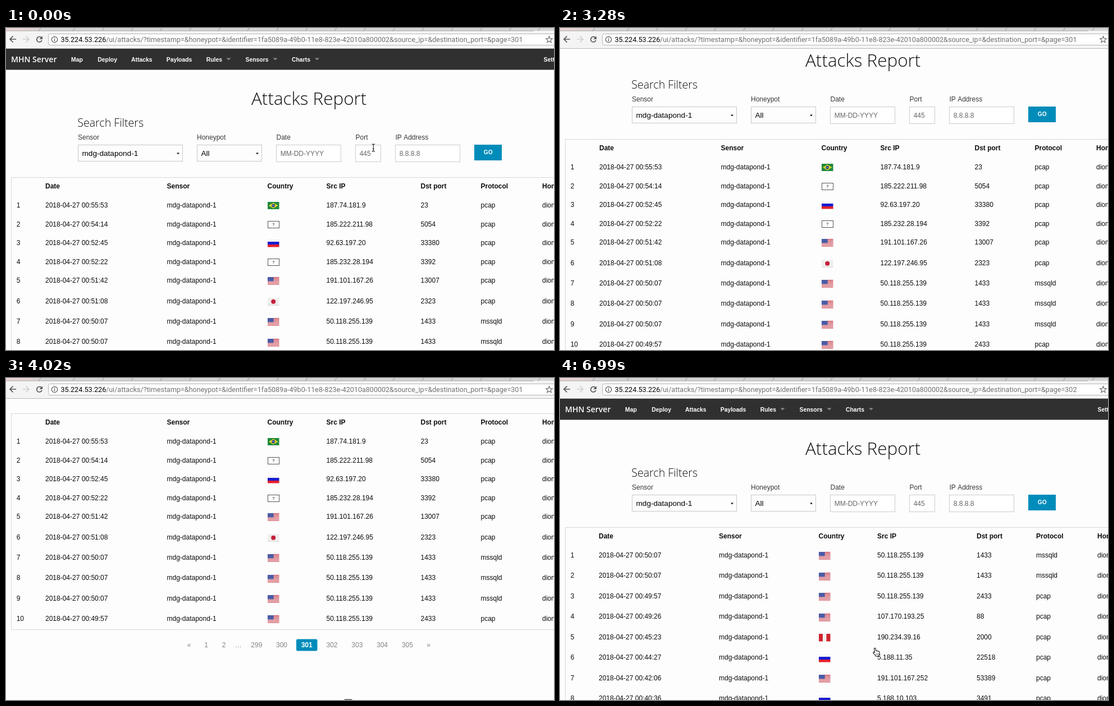
Recreate the animation shown at these times as an HTML page with a canvas. Size 976 by 574 pixels, loop 8 s.

```html
<!DOCTYPE html>
<html lang="en">
<head>
<meta charset="utf-8">
<title>Attacks Report</title>
<style>
html, body { margin: 0; width: 100%; height: 100%; overflow: hidden; background: #fdfdfd; }
canvas { display: block; width: 976px; height: 574px; }
</style>
</head>
<body>
<canvas id="stage" width="976" height="574"></canvas>
<script>
const ctx = document.getElementById('stage').getContext('2d');
const W = 976, H = 574, LOOP = 8000;
const SANS = '"Liberation Sans", Arial, sans-serif';
const OPEN = '"Open Sans", sans-serif';
const ROBOTO = 'Roboto, sans-serif';
const INK = '#0c0c0c';
const SENSOR = 'mdg-datapond-1';
const HOST = '35.224.53.226';
const PATH = '/ui/attacks/?timestamp=&honeypot=&identifier=1fa5089a-49b0-11e8-823e-42010a800002&source_ip=&destination_port=&page=';

// [time, value] steps, each held until the next one
const SCROLL = [[0, 0], [2840, 34], [3280, 68], [3430, 102], [3570, 136], [3720, 170], [3870, 198], [4020, 203], [6990, 0]];
const POINTER = [
  [0, ['beam', 650, 206]], [140, ['arrow', 703, 97]], [290, ['arrow', 889, 143]], [440, null],
  [4460, ['arrow', 902, 340]], [4610, ['arrow', 754, 416]], [4760, ['arrow', 699, 429]],
  [4910, ['arrow', 660, 429]], [5210, ['arrow', 599, 470]], [5360, ['arrow', 596, 472]],
  [5500, ['hand', 565, 477.5]], [5650, ['hand', 557, 480.5]]
];

const FIRST = {
  cols: [70, 286.5, 465.5, 570.5, 738.5, 845.5, 955],
  rowY: i => i < 5 ? 315.5 + 33.6 * i : 449.9 + 36.4 * (i - 4),
  rows: [
    '00:55:53 br 187.74.181.9 23 pcap', '00:54:14 ? 185.222.211.98 5054 pcap',
    '00:52:45 ru 92.63.197.20 33380 pcap', '00:52:22 ? 185.232.28.194 3392 pcap',
    '00:51:42 us 191.101.167.26 13007 pcap', '00:51:08 jp 122.197.246.95 2323 pcap',
    '00:50:07 us 50.118.255.139 1433 mssqld', '00:50:07 us 50.118.255.139 1433 mssqld',
    '00:50:07 us 50.118.255.139 1433 mssqld', '00:49:57 us 50.118.255.139 2433 pcap'
  ]
};
const SECOND = {
  cols: [69, 283, 460.5, 565, 742, 848, 957],
  rowY: i => 315.5 + 36.5 * i,
  rows: [
    '00:50:07 us 50.118.255.139 1433 mssqld', '00:50:07 us 50.118.255.139 1433 mssqld',
    '00:49:57 us 50.118.255.139 2433 pcap', '00:49:26 us 107.170.193.25 88 pcap',
    '00:45:23 pe 190.234.39.16 2000 pcap', '00:44:27 ru 5.188.11.35 22518 pcap',
    '00:42:06 us 191.101.167.252 53389 pcap', '00:40:36 ru 5.188.10.103 3491 pcap'
  ]
};
const HEADS = ['Date', 'Sensor', 'Country', 'Src IP', 'Dst port', 'Protocol', 'Honeypot'];

function at(steps, t) {
  let value = steps[0][1];
  for (const [time, v] of steps) if (t >= time) value = v;
  return value;
}

function text(s, x, y, font, color, align = 'left') {
  ctx.font = font;
  ctx.fillStyle = color;
  ctx.textAlign = align;
  ctx.fillText(s, x, y);
}

function rect(x, y, w, h, color) {
  ctx.fillStyle = color;
  ctx.fillRect(x, y, w, h);
}

function box(x, y, w, h, fill, border) {
  rect(x, y, w, h, fill);
  ctx.strokeStyle = border;
  ctx.lineWidth = 1;
  ctx.strokeRect(x + .5, y + .5, w - 1, h - 1);
}

function rounded(x, y, w, h, r, fill, border) {
  ctx.beginPath();
  ctx.roundRect(x, y, w, h, r);
  ctx.fillStyle = fill;
  ctx.fill();
  if (border) stroke(null, border, 1);
}

function stroke(path, color, width) {
  ctx.strokeStyle = color;
  ctx.lineWidth = width;
  path ? ctx.stroke(new Path2D(path)) : ctx.stroke();
}

function dot(x, y, r, color) {
  ctx.beginPath();
  ctx.arc(x, y, r, 0, 7);
  ctx.fillStyle = color;
  ctx.fill();
}

function fillPath(path, color) {
  ctx.fillStyle = color;
  ctx.fill(new Path2D(path));
}

function triangle(x, y, w, h, color) {
  fillPath(`M${x - w / 2} ${y}h${w}l${-w / 2} ${h}z`, color);
}

function flag(kind, x, y) {
  ctx.save();
  ctx.translate(Math.round(x), Math.round(y - 5.5));
  if (kind === '?') {
    box(0, 0, 21, 13, '#fff', '#555');
    text('?', 10.5, 9, 'bold 7px ' + SANS, '#555', 'center');
  } else if (kind === 'br') {
    rect(0, 0, 20.5, 13, '#1f8a3c');
    fillPath('M2 6.5L10.2 1.5L18.5 6.5L10.2 11.5z', '#ecd42c');
    dot(10.2, 6.5, 3, '#25457f');
    stroke('M7.5 6Q10 5.5 12.7 7.5', '#bcd2dc', .8);
  } else if (kind === 'ru') {
    rect(0, 0, 20.5, 4.5, '#f5f5f5');
    rect(0, 4, 20.5, 5, '#1b1bd0');
    rect(0, 9, 20.5, 4.5, '#e51f2b');
  } else if (kind === 'jp') {
    rect(0, 0, 20.5, 13.5, '#f0eeee');
    rect(0, 12.5, 20.5, 1, '#d5d3d3');
    dot(10.2, 6.8, 4, '#c51f3b');
  } else if (kind === 'pe') {
    rect(0, 0, 20.5, 13.5, '#f3efef');
    rect(0, 0, 7, 13.5, '#cf2530');
    rect(13.5, 0, 7, 13.5, '#cf2530');
  } else {
    for (let i = 0; i < 13; i++) rect(0, i * 1.04, 20.5, 1.04, i % 2 ? '#ecd2d4' : '#c93443');
    rect(0, 0, 10.5, 7.3, '#3d4f9f');
    for (let i = 0; i < 12; i++) rect(1 + i % 4 * 2.3, 1 + Math.floor(i / 4) * 2.1, .8, .8, '#a5add4');
  }
  ctx.restore();
}

function chrome(loading, page) {
  rect(0, 0, W, 37, '#f4f4f4');
  rect(0, 0, W, 5, '#d6d4d5');
  const glow = ctx.createLinearGradient(0, 0, 62, 0);
  glow.addColorStop(0, '#ecd3d1');
  glow.addColorStop(1, '#dcd5d5');
  rect(0, 0, 62, 5, glow);
  rect(0, 4.5, 940, 1, '#a9a7a8');
  for (let i = 0; i < 18; i++) {
    const x = i ? 67 + i * 51.8 : 58;
    stroke(`M${x} 5l4 -5`, '#8d8b8c', 1);
  }
  rect(0, 36, W, 1, '#b9b9b9');

  stroke('M18 20H7.5M12.5 14.5L7 20L12.5 25.5', '#555', 1.7);
  stroke('M30 20H40.5M35.5 14.5L41 20L35.5 25.5', '#cfcfcf', 1.7);
  if (loading) {
    stroke('M55 16L64 25M64 16L55 25', '#555', 1.7);
  } else {
    ctx.beginPath();
    ctx.arc(59.5, 20.3, 4.7, .35, 5.5);
    stroke(null, '#555', 1.7);
    fillPath('M65 14.5V20H59.5z', '#555');
  }
  rounded(75.5, 10.5, 920, 20, 3, '#fff', '#b5b5b5');
  ctx.beginPath();
  ctx.arc(86.5, 20.5, 5.2, 0, 7);
  stroke(null, '#555', 1.2);
  rect(85.8, 17.5, 1.4, 1.4, '#555');
  rect(85.8, 19.8, 1.4, 3.6, '#555');
  text(HOST, 97.5, 24.5, '12.6px ' + ROBOTO, '#000');
  text(PATH + page, 178, 24.5, '12.55px ' + ROBOTO, '#707070');

  ctx.beginPath();
  for (let i = 0; i < 10; i++) {
    const a = -Math.PI / 2 + i * Math.PI / 5, r = i % 2 ? 2.7 : 6.2;
    ctx.lineTo(967.5 + r * Math.cos(a), 20.8 + r * Math.sin(a));
  }
  ctx.closePath();
  stroke(null, '#666', 1.1);
}

function navBar() {
  rect(0, 37, W, 37.5, '#303030');
  text('MHN Server', 9, 61, '600 14px ' + OPEN, '#fff');
  const items = [['Map', 116], ['Deploy', 163.3], ['Attacks', 223], ['Payloads', 285.7],
    ['Rules', 356.7, 396.5], ['Sensors', 426.5, 479.5], ['Charts', 509, 554], ['Settings', 957.5]];
  for (const [label, x, arrow] of items) {
    text(label, x, 59.5, 'bold 10.4px ' + SANS, '#fff');
    if (arrow) triangle(arrow, 53.5, 8, 4, '#858585');
  }
}

function filters() {
  text('Attacks Report', 437, 136.7, '300 31.45px ' + OPEN, '#111');
  text('Search Filters', 127.3, 176.3, '300 19.6px ' + OPEN, '#111');
  const labels = [['Sensor', 128], ['Honeypot', 340], ['Date', 481.5], ['Port', 622.5], ['IP Address', 693.5]];
  for (const [label, x] of labels) text(label, x, 199, '12px ' + SANS, '#383838');
  for (const [x, w, value] of [[128, 187, SENSOR], [340, 116, 'All']]) {
    box(x, 208, w, 30, '#fdfdfd', '#c8c8c8');
    text(value, x + 7.5, 228, '13.6px ' + SANS, '#000');
    triangle(x + w - 8.5, 222.5, 5, 3, '#111');
  }
  for (const [x, w, hint] of [[481, 116, 'MM-DD-YYYY'], [622, 46, '445'], [693, 116, '8.8.8.8']]) {
    box(x, 208, w, 31, '#fff', '#ccc');
    text(hint, x + 7.7, 228, '12px ' + SANS, '#666');
  }
  rect(834, 208, 49, 28, '#008cba');
  text('GO', 858.7, 225, 'bold 10.2px ' + SANS, '#fff', 'center');
}

function table({ cols, rowY, rows }) {
  box(9, 266, 1100, 386, '#fdfdfd', '#d8d8d8');
  HEADS.forEach((head, i) => text(head, cols[i], 286, 'bold 12px ' + SANS, INK));
  rows.forEach((row, i) => {
    const [time, country, ip, port, protocol] = row.split(' ');
    const y = rowY(i), baseline = Math.round(y + 4.4);
    const cells = ['2018-04-27 ' + time, SENSOR, null, ip, port, protocol, 'dionaea'];
    text(i + 1, 18.7, baseline, '12px ' + SANS, INK);
    cells.forEach((cell, c) => cell && text(cell, cols[c], baseline, '12px ' + SANS, INK));
    flag(country, cols[2], y);
  });
}

function pager(hover) {
  const items = [['«', 326], ['1', 356.5], ['2', 388], ['…', 414], ['299', 446.3], ['300', 491],
    ['301', 535.7], ['302', 580.5], ['303', 625.3], ['304', 670], ['305', 714.8], ['»', 752.5]];
  rounded(517, 668.5, 37.5, 21, 2.5, '#008cba');
  if (hover) rounded(562, 668.5, 37.5, 21, 2.5, '#e4e4e4');
  for (const [label, x] of items) {
    const current = label === '301';
    text(label, x, 683, (current ? 'bold ' : '') + '12px ' + SANS, current ? '#fff' : '#848484', 'center');
  }
  rounded(602, 775.5, 15, 8, 2, '#555');
}

function pointer(state) {
  if (!state) return;
  const [kind, x, y] = state;
  ctx.save();
  ctx.translate(x, y);
  ctx.lineJoin = 'round';
  if (kind === 'beam') {
    const beam = 'M1.5 .8Q4.3 .8 4.3 3V12Q4.3 14.2 1.5 14.2M7.1 .8Q4.3 .8 4.3 3M7.1 14.2Q4.3 14.2 4.3 12M2.8 9.5H5.8';
    stroke(beam, '#fff', 2.2);
    stroke(beam, '#222', 1.1);
  } else if (kind === 'arrow') {
    const arrow = 'M1 1V12L3.6 9.6L5.6 14L7.5 13.2L5.6 9H9.4Z';
    stroke(arrow, '#fff', 1.8);
    fillPath(arrow, '#000');
  } else {
    const hand = 'M2.4 2Q3.6 0 5 1.6L6 6Q7.2 5 8.2 6.2Q9.6 5.5 10.2 7Q11.9 6.6 12 8.6V11Q12 13 10.8 14.3V15.5H5.2V14.4L1.5 10.6Q.2 8.8 1.2 8.1Q2.3 7.5 3.6 8.8Z';
    fillPath(hand, '#fff');
    stroke(hand, '#111', 1.1);
    stroke('M6.6 10.5V13M8.3 10.5V13M10 10.5V13', '#333', .7);
  }
  ctx.restore();
}

function draw(t) {
  const next = t >= 6990;
  rect(0, 0, W, H, '#fdfdfd');
  ctx.save();
  ctx.beginPath();
  ctx.rect(0, 37, W, H - 37);
  ctx.clip();
  ctx.translate(0, -at(SCROLL, t));
  navBar();
  filters();
  table(next ? SECOND : FIRST);
  if (!next) pager(t >= 5500);
  ctx.restore();
  chrome(t >= 5950 && !next, t >= 6840 ? 302 : 301);
  pointer(at(POINTER, t));
}

const start = performance.now();
function tick() {
  draw((performance.now() - start) % LOOP);
  requestAnimationFrame(tick);
}
tick();
</script>
</body>
</html>
```
